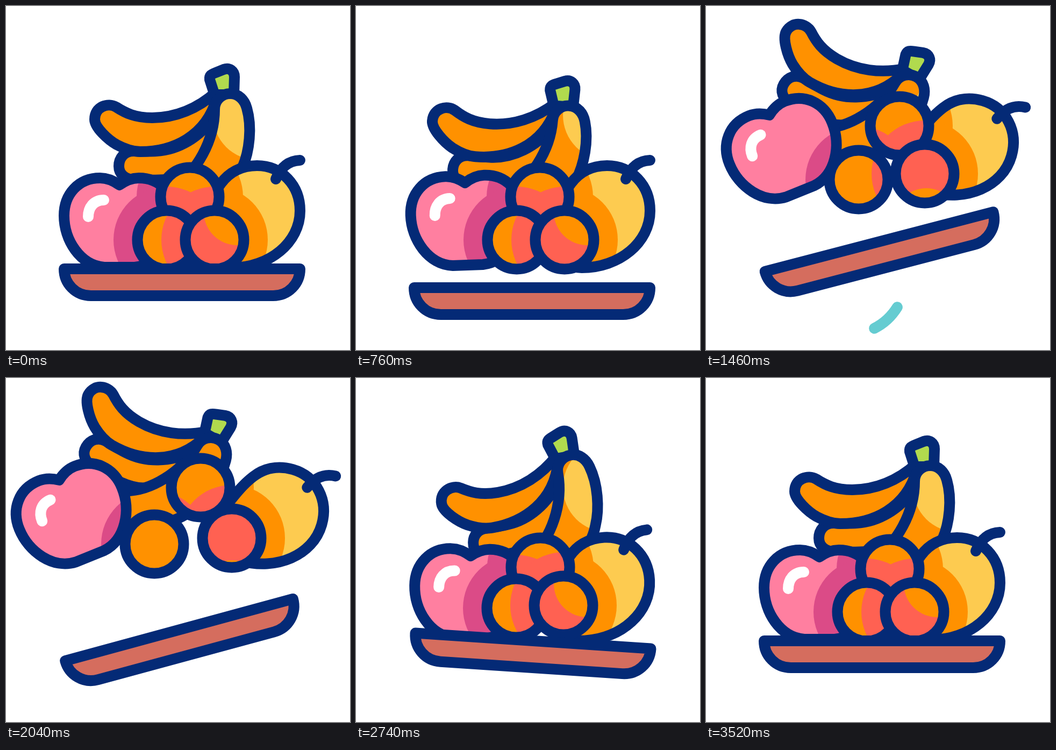
These frames come from a looping animation (640x640 px, 3.6 s). An HTML page with a canvas:

```html
<!DOCTYPE html>
<html lang="en">
<head>
<meta charset="utf-8">
<title>Fruit tray</title>
<style>
html, body { margin: 0; width: 100%; height: 100%; overflow: hidden; background: #fff; }
canvas { display: block; width: 640px; height: 640px; }
</style>
</head>
<body>
<canvas id="stage" width="640" height="640"></canvas>
<script>
const ctx = document.getElementById('stage').getContext('2d');
const LOOP = 3600;
const NAVY = '#042a76', ORANGE = '#ff9100', YELLOW = '#fdcb50', RED = '#ff6152',
  PINK = '#ff7fa0', PLUM = '#db4b87', GREEN = '#b1da4e', CLAY = '#d56d5e', CYAN = '#65ccd1';

const ramp = (t, a, b) => Math.min(1, Math.max(0, (t - a) / (b - a)));
const smooth = (t, a, b) => { const u = ramp(t, a, b); return u * u * (3 - 2 * u); };
const easeOut = (t, a, b) => 1 - (1 - ramp(t, a, b)) ** 3;

// How strongly each phase acts: sink, toss with slow drift, rebound, settle
function phases(t) {
  const air = easeOut(t, 780, 940) - easeOut(t, 2160, 2260);
  const press = Math.sin(Math.PI * ramp(t, 2180, 2400)) / 2;
  return {
    dip: ramp(t, 80, 760) ** 2 * (1 - easeOut(t, 780, 940)) + press,
    air,
    drift: air * (t - 1460) / 580,
    hop: smooth(t, 2240, 2420) - smooth(t, 2420, 2740),
    settle: smooth(t, 2420, 2740) - smooth(t, 2740, 3400)
  };
}

// Pivot at rest, and its offset [x, y, degrees] in each phase
const parts = {
  bunch: { at: [383, 177], dip: [-21, 20, 4.5], air: [-28, -50, 30], drift: [4, -17], hop: [-39, -20, 7.5], settle: [-15, -14, -10] },
  apple: { at: [211, 400], dip: [-6, -4, -2], air: [-68, -135, -22], drift: [-19, -13], hop: [3, -13, 10], settle: [1, -2, 1] },
  mango: { at: [455, 395], air: [21, -128, 16], drift: [19, -6], hop: [-7, -38, 1], settle: [0, 0, -3] },
  top: { at: [342, 355], air: [18, -132], drift: [2, -19], hop: [9, -63], settle: [1, -3] },
  left: { at: [299, 435], air: [-15, -112], drift: [-8, -14], hop: [-1, -37], settle: [-1, -7] },
  right: { at: [388, 435], air: [19, -123], drift: [13, -14], hop: [-2, -11], settle: [-2, -12] },
  tray: { at: [327.5, 489], dip: [0, 35], air: [-5.5, -50.5, -14.6], drift: [0, 30, -0.6], hop: [2.5, -3.5, 5.9], settle: [2, 0, 3.8] },
  glow: { at: [430, 383], air: [-20, 18], drift: [10, 0] }
};

function pose(part, weights) {
  const [px, py] = part.at;
  const sum = axis => Object.keys(weights)
    .reduce((s, k) => s + weights[k] * (part[k]?.[axis] ?? 0), 0);
  return { px, py, x: px + sum(0), y: py + sum(1), a: sum(2) * Math.PI / 180 };
}

const path = d => new Path2D(d);
const shapes = {
  upper: path('M391 160C357 191 315 208 272 208C240 208 222 199 205 188C190 179 165 187 165 211C165 226 190 249 206 258C225 268 240 271 250 271C310 271 372 243 392 172Z'),
  lower: path('M388 205C360 245 320 268 280 270C265 271 245 270 237 270C220 270 210 283 210 298C210 313 222 323 240 323C280 325 320 325 345 308C380 285 389 245 388 205Z'),
  front: path('M417 163C433 163 444 175 448 190C458 225 453 270 440 300C425 340 380 378 330 390C300 396 275 385 275 362C275 345 295 342 313 333C355 310 388 250 388 192C388 175 402 163 417 163Z'),
  stem: path('M379 137C378 129 382 127 390 124L405 118C416 114 425 121 425 132L424 165H388Z'),
  apple: path('M211 333C200 325 187 320 175 320C135 320 108 350 108 390C108 435 138 483 183 486H239C284 483 314 435 314 390C314 350 287 320 247 320C235 320 222 325 211 333Z'),
  shine: path('M153 392C153 375 163 361 182 361'),
  mango: path('M467 297C513 297 547 334 547 381C547 440 490 487 420 487C375 487 350 440 365 400C375 375 385 350 400 330C414 311 436 297 467 297Z'),
  stalk: path('M502 322C510 303 523 288 547 287'),
  tray: path('M108 489H547C547 517 525 539 497 539H158C130 539 108 517 108 489Z'),
  swoosh: path('M368 535C354 575 320 611 262 611')
};
const SWOOSH = 137;

function place(p) {
  ctx.translate(p.x, p.y);
  ctx.rotate(p.a);
  ctx.translate(-p.px, -p.py);
}

function disc(p, r, color) {
  ctx.beginPath();
  ctx.arc(p.x, p.y, r, 0, 7);
  ctx.fillStyle = color;
  ctx.fill();
}

function line(shape, p, color) {
  ctx.save();
  place(p);
  ctx.strokeStyle = color;
  ctx.stroke(shape);
  ctx.restore();
}

// Outlined body; shades are painted in stage space inside it
function body(shape, p, color, shade) {
  ctx.save();
  place(p);
  ctx.fillStyle = color;
  ctx.fill(shape);
  if (shade) {
    ctx.clip(shape);
    ctx.setTransform(1, 0, 0, 1, 0, 0);
    shade();
  }
  ctx.restore();
  line(shape, p, NAVY);
}

function ball(p, color, shade) {
  const round = new Path2D();
  round.arc(p.px, p.py, 54.5, 0, 7);
  body(round, p, color, shade);
}

function swoosh(t) {
  const head = SWOOSH * easeOut(t, 1340, 1760), tail = SWOOSH * ramp(t, 1380, 1770);
  if (head - tail < 0.5) return;
  ctx.save();
  ctx.setLineDash([head - tail, 999]);
  ctx.lineDashOffset = -tail;
  ctx.strokeStyle = CYAN;
  ctx.stroke(shapes.swoosh);
  ctx.restore();
}

function draw(t) {
  const weights = phases(t), p = {};
  for (const name in parts) p[name] = pose(parts[name], weights);
  const shadow = (color, ...from) => () => from.forEach(c => disc(c, 99, color));

  ctx.fillStyle = '#fff';
  ctx.fillRect(0, 0, 640, 640);
  ctx.lineCap = ctx.lineJoin = 'round';
  ctx.lineWidth = 20;

  swoosh(t);

  body(shapes.lower, p.bunch, ORANGE);
  body(shapes.upper, p.bunch, ORANGE);
  body(shapes.stem, p.bunch, GREEN);
  body(shapes.front, p.bunch, ORANGE, () => disc({ x: 469, y: 203 }, 84, YELLOW));

  body(shapes.mango, p.mango, YELLOW, shadow(ORANGE, p.top, p.right));
  line(shapes.stalk, p.mango, NAVY);

  body(shapes.apple, p.apple, PINK, shadow(PLUM, p.top, p.left));
  line(shapes.shine, p.apple, '#fff');

  ball(p.top, ORANGE, shadow(RED, p.left, p.right));
  ball(p.left, ORANGE, shadow(RED, p.right));
  ball(p.right, RED, () => disc(p.glow, 62, ORANGE));

  body(shapes.tray, p.tray, CLAY);
}

let begin;
function tick(now) {
  begin ??= now;
  draw((now - begin) % LOOP);
  requestAnimationFrame(tick);
}
draw(0);
requestAnimationFrame(tick);
</script>
</body>
</html>
```
